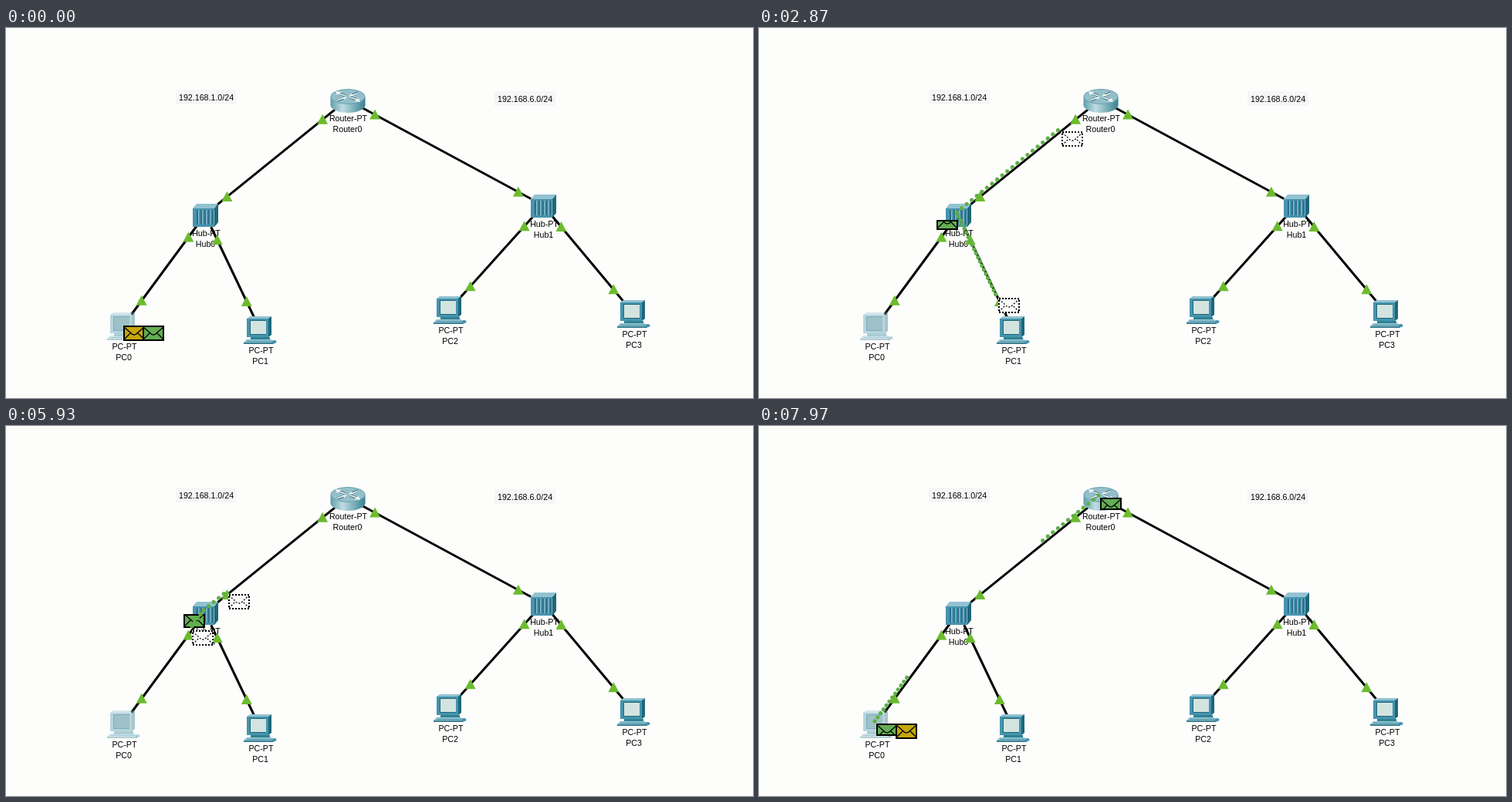
Animation, 968 px wide and 480 px high, one loop 8000 ms. Source, as an HTML page with a canvas:

```html
<!DOCTYPE html>
<html lang="en">
<head>
<meta charset="utf-8">
<title>Packet flow</title>
<style>
  html, body { margin: 0; width: 100%; height: 100%; overflow: hidden; background: #fdfdfc; }
  canvas { display: block; }
</style>
</head>
<body>
<canvas id="stage" width="968" height="480"></canvas>
<script>
const ctx = document.getElementById('stage').getContext('2d');
const LOOP = 8000, FLIGHT = 1430;
const ENV_W = 28, ENV_H = 20, DOTS = 28;
const PAPER = '#fdfdfc', GREEN = '#64ae54', YELLOW = '#c5a60b';
const DARK = '#1d6878', TEAL = '#4694ae', PALE = '#92c2d0';

// Each kind: icon, distance of the link light, distance of the caption.
const router = { type: 'Router-PT', icon: drawRouter, light: 41, caption: 28 };
const hub = { type: 'Hub-PT', icon: drawHub, light: 36.5, caption: 28 };
const pc = { type: 'PC-PT', icon: drawPc, light: 40, caption: 31 };

const device = (kind, name, x, y) => ({ kind, name, x, y });
const router0 = device(router, 'Router0', 442, 93);
const hub0 = device(hub, 'Hub0', 258, 242);
const hub1 = device(hub, 'Hub1', 696, 230);
const pc0 = device(pc, 'PC0', 152, 386);
const pc1 = device(pc, 'PC1', 329, 391);
const pc2 = device(pc, 'PC2', 575, 365);
const pc3 = device(pc, 'PC3', 813, 370);
pc0.faded = true;

const devices = [router0, hub0, hub1, pc0, pc1, pc2, pc3];
const cables = [
  [router0, hub0], [router0, hub1], [hub0, pc0], [hub0, pc1], [hub1, pc2], [hub1, pc3]
];
const hops = [
  { start: 660, from: pc0, to: [hub0] },
  { start: 1830, from: hub0, to: [router0, pc1] },
  { start: 3570, from: pc1, to: [hub0] },
  { start: 5700, from: hub0, to: [router0, pc0] }
];

function rect(x, y, w, h, fill) {
  ctx.fillStyle = fill;
  ctx.fillRect(x, y, w, h);
}

function poly(points, fill) {
  ctx.beginPath();
  points.forEach(([x, y]) => ctx.lineTo(x, y));
  ctx.closePath();
  ctx.fillStyle = fill;
  ctx.fill();
}

function line(a, b, color, width) {
  ctx.beginPath();
  ctx.moveTo(...a);
  ctx.lineTo(...b);
  ctx.strokeStyle = color;
  ctx.lineWidth = width;
  ctx.stroke();
}

function oval(x, y, rx, ry, fill) {
  ctx.beginPath();
  ctx.ellipse(x, y, rx, ry, 0, 0, 7);
  ctx.fillStyle = fill;
  ctx.fill();
}

function placed(x, y, draw) {
  ctx.save();
  ctx.translate(x, y);
  draw();
  ctx.restore();
}

// A box seen from the front, its depth going up and to the right.
function box(x, y, w, h, dx, dy) {
  poly([[x, y], [x + dx, y - dy], [x + w + dx, y - dy], [x + w, y]], PALE);
  poly([[x + w, y], [x + w + dx, y - dy], [x + w + dx, y + h - dy], [x + w, y + h]], DARK);
  rect(x, y, w, h, TEAL);
}

function drawHub() {
  box(-16, -8, 28, 24, 5, 6);
  for (let x = -11; x < 11; x += 5) {
    rect(x, -6, 2, 19, '#2b6b88');
    rect(x + 2, -6, 1, 19, PALE);
  }
}

function drawPc() {
  box(-17, -14, 28, 24, 4, 3);
  rect(-13, -12, 21, 19, DARK);
  rect(-12, -11, 20, 17, '#d3e4e0');
  rect(-12, 10, 25, 4, '#2f8292');
  poly([[-17, 13], [15, 13], [18, 17], [-21, 17]], PALE);
  rect(-21, 17, 39, 2, '#3b7f90');
  line([-17, 15.5], [15, 15.5], TEAL, 1);
  oval(18.5, 16, 3, 2, TEAL);
}

function drawRouter() {
  const side = ctx.createLinearGradient(-22, 0, 24, 0);
  side.addColorStop(0, '#5c9cab');
  side.addColorStop(.35, '#c0dde2');
  side.addColorStop(1, '#357f90');
  oval(1, 7, 22.5, 10, side);
  rect(-21.5, -4, 45, 11, side);
  oval(1, -4, 22.5, 10, '#6ba3b1');
  oval(1, -4, 21.5, 9, '#94bfca');
  // crossed arrows, one quarter mirrored four times
  for (const sx of [-1, 1]) for (const sy of [-1, 1]) placed(1, -4, () => {
    ctx.scale(sx, sy);
    line([3, 1], [13, 5], '#3a6d7a', 3);
    line([3, 1], [13, 4.5], '#eef5f4', 1.8);
    poly(sx === sy ? [[14, 2], [16, 7], [8, 6]] : [[1, 0], [8, 1], [4, 4]], '#eef5f4');
  });
}

// The point a given number of pixels from a towards b.
function towards(a, b, distance) {
  return between(a, b, distance / Math.hypot(b.x - a.x, b.y - a.y));
}

function between(a, b, f) {
  return [a.x + (b.x - a.x) * f, a.y + (b.y - a.y) * f];
}

function text(str, x, y, align) {
  ctx.textAlign = align;
  ctx.fillStyle = '#000';
  ctx.fillText(str, x, y);
}

function subnet(str, x, y) {
  rect(x - 4, y - 14, 79, 19, '#f6f6f8');
  text(str, x, y, 'left');
}

function light(x, y) {
  poly([[x, y - 7], [x + 7, y + 6], [x - 7, y + 6]], '#6cbb2e');
}

function scene() {
  rect(0, 0, 968, 480, PAPER);
  cables.forEach(([a, b]) => line(towards(a, b, 18), towards(b, a, 18), '#000', 3));
  for (const { kind, x, y, faded } of devices) {
    ctx.globalAlpha = faded ? .38 : 1;
    placed(x, y, kind.icon);
  }
  ctx.globalAlpha = 1;
  ctx.font = '10.67px "Liberation Sans", Arial, sans-serif';
  for (const { kind, name, x, y } of devices) {
    text(kind.type, x + 1.5, y + kind.caption, 'center');
    text(name, x + .5, y + kind.caption + 14, 'center');
  }
  subnet('192.168.1.0/24', 224, 94);
  subnet('192.168.6.0/24', 637, 96);
  for (const [a, b] of cables) {
    light(...towards(a, b, a.kind.light));
    light(...towards(b, a, b.kind.light));
  }
}

function flap() {
  ctx.beginPath();
  ctx.moveTo(1, 2);
  ctx.lineTo(9, 9);
  ctx.quadraticCurveTo(14, 15, 19, 9);
  ctx.lineTo(27, 2);
  for (const [edge, middle] of [[1, 9], [27, 19]]) {
    ctx.moveTo(edge, 18);
    ctx.lineTo(middle, 10);
  }
  ctx.lineWidth = 1.3;
  ctx.stroke();
}

// Shows only the rows from top to bottom of a full envelope.
function envelope(x, y, color, top = 0, bottom = ENV_H, dash = []) {
  placed(Math.round(x), Math.round(y), () => {
    const h = bottom - top;
    ctx.beginPath();
    ctx.rect(0, top, ENV_W, h);
    ctx.clip();
    rect(0, top, ENV_W, h, color);
    ctx.strokeStyle = '#000';
    ctx.setLineDash(dash);
    flap();
    ctx.lineWidth = 2;
    ctx.strokeRect(1, top + 1, ENV_W - 2, h - 2);
  });
}

function trail(a, b, tail, head) {
  for (let i = 0; i <= DOTS; i++) {
    const f = i / DOTS;
    if (f < tail || f > head) continue;
    const [x, y] = between(a, b, f);
    oval(x - 2, y - 3, 2.6, 2.6, '#5eb046');
  }
}

// Progress 0 to 1 is the flight; after 1 the trail runs out and the envelope unfolds.
function drawHop({ start, from, to }, t) {
  const p = (t - start) / FLIGHT;
  const rows = Math.round(ENV_H * p / 2);
  if (p < 1) envelope(from.x - ENV_W, from.y, GREEN, rows);
  for (const goal of to) {
    if (p < 1) envelope(...between(from, goal, p), PAPER, 0, ENV_H, [2, 2]);
    trail(from, goal, p - 1, p);
    if (p >= 1) envelope(goal.x, goal.y, GREEN, 0, rows);
  }
}

function draw(t) {
  scene();
  const last = hops[hops.length - 1];
  const hop = hops.filter(h => h.start <= t).pop();
  if (hop) {
    drawHop(hop, t);
  } else {
    envelope(pc0.x, pc0.y, YELLOW);
    envelope(pc0.x + 25, pc0.y, GREEN);
  }
  if (t >= last.start + FLIGHT) envelope(pc0.x + 25, pc0.y, YELLOW);
}

function tick(now) {
  draw(now % LOOP);
  requestAnimationFrame(tick);
}
requestAnimationFrame(tick);
</script>
</body>
</html>
```
